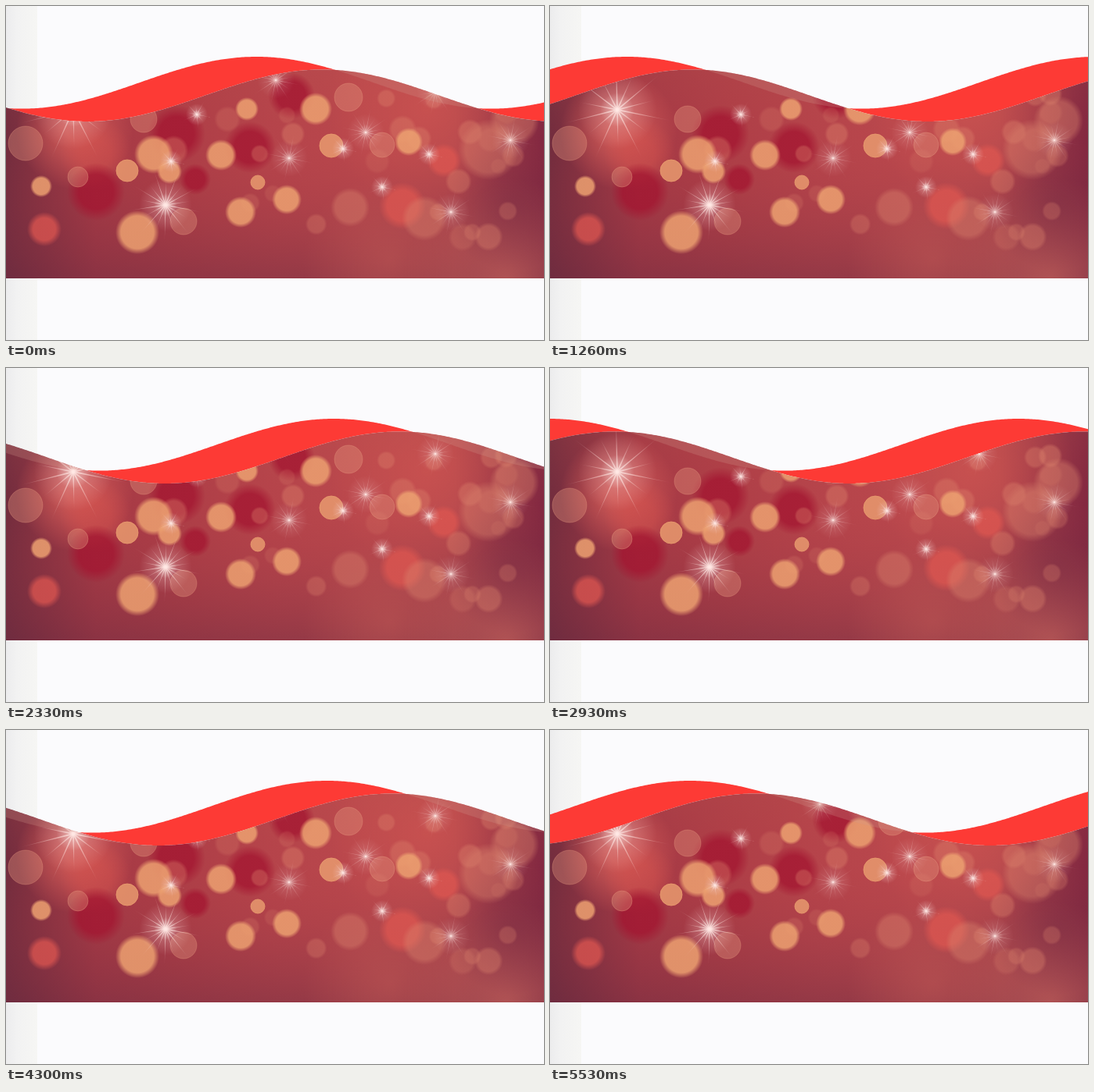
An HTML page with a canvas for the animation above (5560 ms loop, 688x428 px).

```html
<!DOCTYPE html>
<html lang="en">
<head>
<meta charset="utf-8">
<title>Waves over lights</title>
<style>
html, body { margin: 0; width: 100%; height: 100%; overflow: hidden; background: #fbfbfd; }
canvas { display: block; }
</style>
</head>
<body>
<canvas id="stage" width="688" height="428"></canvas>
<script>
const W = 688, H = 428, BOTTOM = 349, LOOP = 5560;
const WAVELENGTH = 600, LAG = 84, AMPLITUDE = 33.3;
const START = 320, SPEED = 0.3; // crest position in px, px per ms
const ctx = document.getElementById('stage').getContext('2d');

function seeded(seed) {
  return () => (seed = seed * 16807 % 2147483647) / 2147483647;
}

function withStops(fill, stops) {
  stops.forEach(([at, color]) => fill.addColorStop(at, color));
  return fill;
}

function makeLights() {
  const layer = document.createElement('canvas');
  layer.width = W;
  layer.height = BOTTOM;
  const g = layer.getContext('2d');
  const random = seeded(41);
  const between = (a, b) => a + (b - a) * random();

  function wash(x, y, colors) {
    g.fillStyle = withStops(g.createLinearGradient(0, 0, x, y), colors.map((c, i) => [i / (colors.length - 1), c]));
    g.fillRect(0, 0, W, BOTTOM);
  }

  // A soft disc; `core` is the flat share of its radius.
  function glow(x, y, r, rgb, alpha, core = 0) {
    const full = `rgba(${rgb},${alpha})`;
    g.fillStyle = withStops(g.createRadialGradient(x, y, 0, x, y, r), [[0, full], [core, full], [1, `rgba(${rgb},0)`]]);
    g.fillRect(x - r, y - r, 2 * r, 2 * r);
  }

  function ring(x, y, r, rgb, alpha) {
    g.beginPath();
    g.arc(x, y, r, 0, 7);
    g.fillStyle = g.strokeStyle = `rgba(${rgb},${alpha})`;
    g.fill();
    g.stroke();
  }

  function star(x, y, r, alpha, rays) {
    glow(x, y, r * 0.7, '240,195,195', alpha * 0.55);
    glow(x, y, r * 0.3, '255,240,236', alpha * 0.7);
    for (let i = 0; i < rays; i++) {
      const a = i * 2 * Math.PI / rays + 0.2, len = r * (i % 2 ? 0.7 : 1);
      const dx = Math.cos(a), dy = Math.sin(a), w = r * 0.014;
      g.fillStyle = withStops(g.createRadialGradient(x, y, 0, x, y, len),
        [[0, `rgba(255,232,228,${alpha})`], [1, 'rgba(255,220,215,0)']]);
      g.beginPath();
      g.moveTo(x - w * dy, y + w * dx);
      g.lineTo(x + len * dx, y + len * dy);
      g.lineTo(x + w * dy, y - w * dx);
      g.fill();
    }
  }

  wash(W, 0, ['#6a2a3d', '#a23845', '#ad3e47', '#b5444b', '#b9484d', '#b0474d', '#7c2540']);
  wash(0, BOTTOM, ['rgba(190,95,80,.35)', 'rgba(185,65,70,.1)', 'rgba(115,45,65,.5)']);

  // Broad areas of light and shade
  glow(640, 350, 130, '205,105,95', 0.6);
  glow(490, 325, 110, '195,90,85', 0.5);
  glow(540, 130, 130, '215,88,82', 0.55);
  glow(88, 160, 75, '225,100,92', 0.75, 0.15);
  glow(115, 190, 46, '210,80,76', 0.5, 0.4);
  glow(645, 255, 85, '110,40,65', 0.4);
  [[115, 238, 37], [218, 164, 37], [312, 181, 33], [365, 115, 30], [242, 222, 20]]
    .forEach(spot => glow(...spot, '163,20,48', 0.75, 0.6));
  [[560, 198, 22], [507, 256, 30], [49, 286, 22]]
    .forEach(spot => glow(...spot, '222,86,80', 0.75, 0.65));

  // Faint lights, scattered mostly to the right
  for (let i = 0; i < 26; i++) {
    glow(W * (0.3 + 0.65 * Math.sqrt(random())), between(110, 300), between(10, 19), '224,135,110', between(0.15, 0.4), 0.75);
  }
  [[617, 184, 39], [650, 147, 32], [440, 258, 25], [535, 272, 29]]
    .forEach(spot => glow(...spot, '218,130,108', 0.42, 0.75));

  // Bright lights
  [[189, 190, 25], [209, 212, 16], [275, 191, 20], [308, 132, 15], [396, 132, 21], [168, 290, 28],
    [300, 264, 20], [359, 248, 19], [515, 174, 18], [45, 231, 14]]
    .forEach(spot => glow(...spot, '236,160,112', 0.86, 0.75));
  [[155, 211, 14], [416, 179, 15], [322, 226, 9]].forEach(spot => ring(...spot, '232,154,110', 0.85));
  [[25, 176, 22], [92, 219, 13], [176, 145, 17], [227, 276, 17], [438, 117, 18], [481, 178, 16]]
    .forEach(spot => ring(...spot, '232,155,130', 0.34));

  star(86, 133, 72, 0.75, 14);
  star(204, 255, 48, 0.85, 18);
  [[244, 139], [211, 199], [431, 183], [541, 190], [481, 232]].forEach(at => star(...at, 20, 0.95, 10));
  [[460, 162], [362, 195], [645, 172], [569, 264], [345, 95], [549, 110]].forEach(at => star(...at, 34, 0.45, 16));
  return layer;
}

const lights = makeLights();
const margin = withStops(ctx.createLinearGradient(0, 0, 40, 0), [[0, '#ececed'], [0.35, '#f2f2f2'], [1, '#f6f6f4']]);

// Traces the area between two height functions.
function band(top, bottom) {
  ctx.beginPath();
  for (let x = 0; x <= W; x += 2) ctx.lineTo(x, top(x));
  for (let x = W; x >= 0; x -= 2) ctx.lineTo(x, bottom(x));
  ctx.closePath();
}

function draw(time) {
  const crest = START + SPEED * (time % LOOP);
  const wave = (x, shift, middle) => middle - AMPLITUDE * Math.cos(2 * Math.PI * (x - crest - shift) / WAVELENGTH);
  const back = x => wave(x, 0, 98.3);
  const front = x => wave(x, LAG, 114.7);
  const lower = x => Math.max(back(x), front(x));

  ctx.fillStyle = '#fbfbfd';
  ctx.fillRect(0, 0, W, H);
  ctx.fillStyle = margin;
  ctx.fillRect(0, 0, 40, H);

  band(back, lower);
  ctx.fillStyle = '#fd3a35';
  ctx.fill();

  ctx.save();
  band(front, () => BOTTOM);
  ctx.clip();
  ctx.drawImage(lights, 0, 0);
  // Pale veil where the front wave rises above the back one
  band(front, lower);
  ctx.fillStyle = 'rgba(205,150,140,.25)';
  ctx.fill();
  ctx.restore();
}

const start = performance.now();
function tick() {
  draw(performance.now() - start);
  requestAnimationFrame(tick);
}
tick();
</script>
</body>
</html>
```
